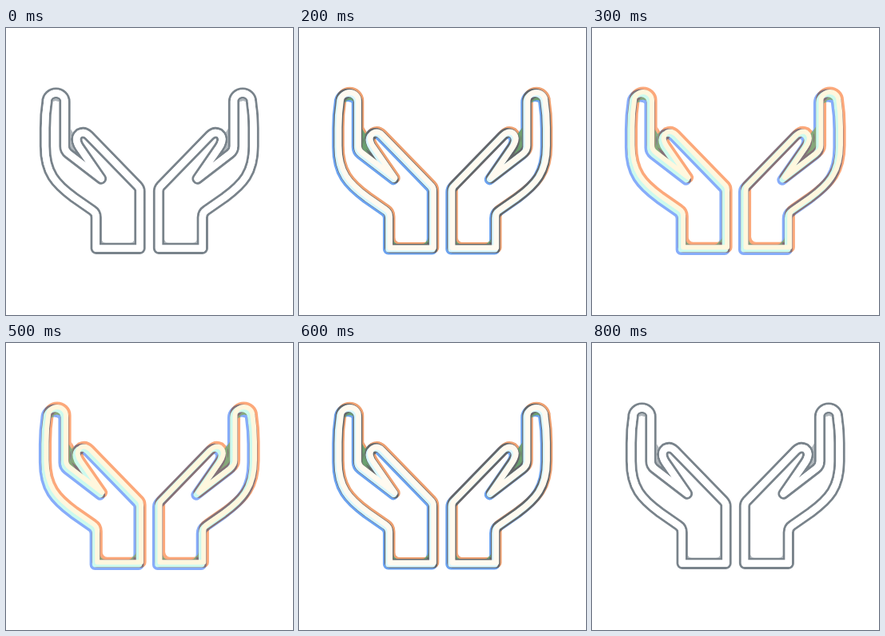
Recreate the animation shown at these times as an HTML page with a canvas. Size 359 by 359 pixels, loop 900 ms.

```html
<!DOCTYPE html>
<html lang="en">
<head>
<meta charset="utf-8">
<title>Open hands</title>
<style>
  html, body { margin: 0; width: 100%; height: 100%; overflow: hidden; background: #fff; }
  canvas { display: block; width: 359px; height: 359px; }
</style>
</head>
<body>
<canvas id="stage" width="359" height="359"></canvas>
<script>
const ctx = document.getElementById('stage').getContext('2d');

function mirrored(data) {
  const left = new Path2D(data);
  const both = new Path2D(left);
  both.addPath(left, new DOMMatrix([-1, 0, 0, 1, 358.5, 0]));
  return both;
}

const hands = mirrored(`M112.7 275.8 H167.5 V204 Q167.5 200.5 165 197.8 L103.5 134.5
  Q98 129 92 132 Q87 136 88.5 142 Q89.5 146 92 149.5 L119 188.5
  L78 157 Q73.5 153.5 73.5 148 L73.5 92 A11 10.5 0 0 0 51.5 92
  Q49 108 49 125 V148 C49 181 62 195 85 212 L108 228 Q112.7 231 112.7 237 Z`);

// Shaded pockets: finger tip, gap beside the thumb, inner corners of the cuff.
const pockets = mirrored(`M55 94 L62 84 L69 94 Q62 88 55 94 Z
  M80 125 L89 140 L94 167 L80 158 Z
  M119 263 Q120 269 125 269 L118 270 Z M161 263 Q160 269 155 269 L162 270 Z`);

// Colours per split level: lower-left edge, upper-right edge, cool core, warm core.
const levels = [
  ['#b0b7bc', '#b0b7bc', '#ffffff', '#ffffff'],
  ['#86acc8', '#cda69c', '#f2fcff', '#fffdfb'],
  ['#6aa2f0', '#eea070', '#d8f7ff', '#fffaf0'],
  ['#86acfa', '#fca87a', '#ccfaee', '#fff7de'],
  ['#a2b8ff', '#ffb08c', '#c4fbe0', '#fff3cc']
];

function paintShifted(shift, blend, paint) {
  ctx.save();
  ctx.globalCompositeOperation = blend;
  ctx.translate(shift, -shift);
  paint();
  ctx.restore();
}

function strokeHands(color, width, shift, blend) {
  paintShifted(shift, blend, () => {
    ctx.lineJoin = 'round';
    ctx.lineWidth = width;
    ctx.strokeStyle = color;
    ctx.stroke(hands);
  });
}

function fillPockets(color, shift) {
  paintShifted(shift, 'darken', () => {
    ctx.fillStyle = color;
    ctx.fill(pockets);
  });
}

function draw(now) {
  const step = Math.floor(now / 100) % 9;
  const level = 4 - Math.abs(step - 4);
  const [cool, warm, coolCore, warmCore] = levels[level];
  const shift = level * 0.5;
  const edgeWidth = 14.2 - level * 0.35;

  ctx.fillStyle = '#fff';
  ctx.fillRect(0, 0, 359, 359);
  strokeHands(cool, edgeWidth, -shift, 'multiply');
  strokeHands(warm, edgeWidth, shift, 'multiply');
  fillPockets(cool, -shift);
  fillPockets(warm, shift);
  strokeHands(coolCore, 8.4 - level * 0.3, -shift * 0.7, 'source-over');
  strokeHands(warmCore, 8.4 - level * 0.8, shift, 'source-over');
  requestAnimationFrame(draw);
}
draw(performance.now());
</script>
</body>
</html>
```
